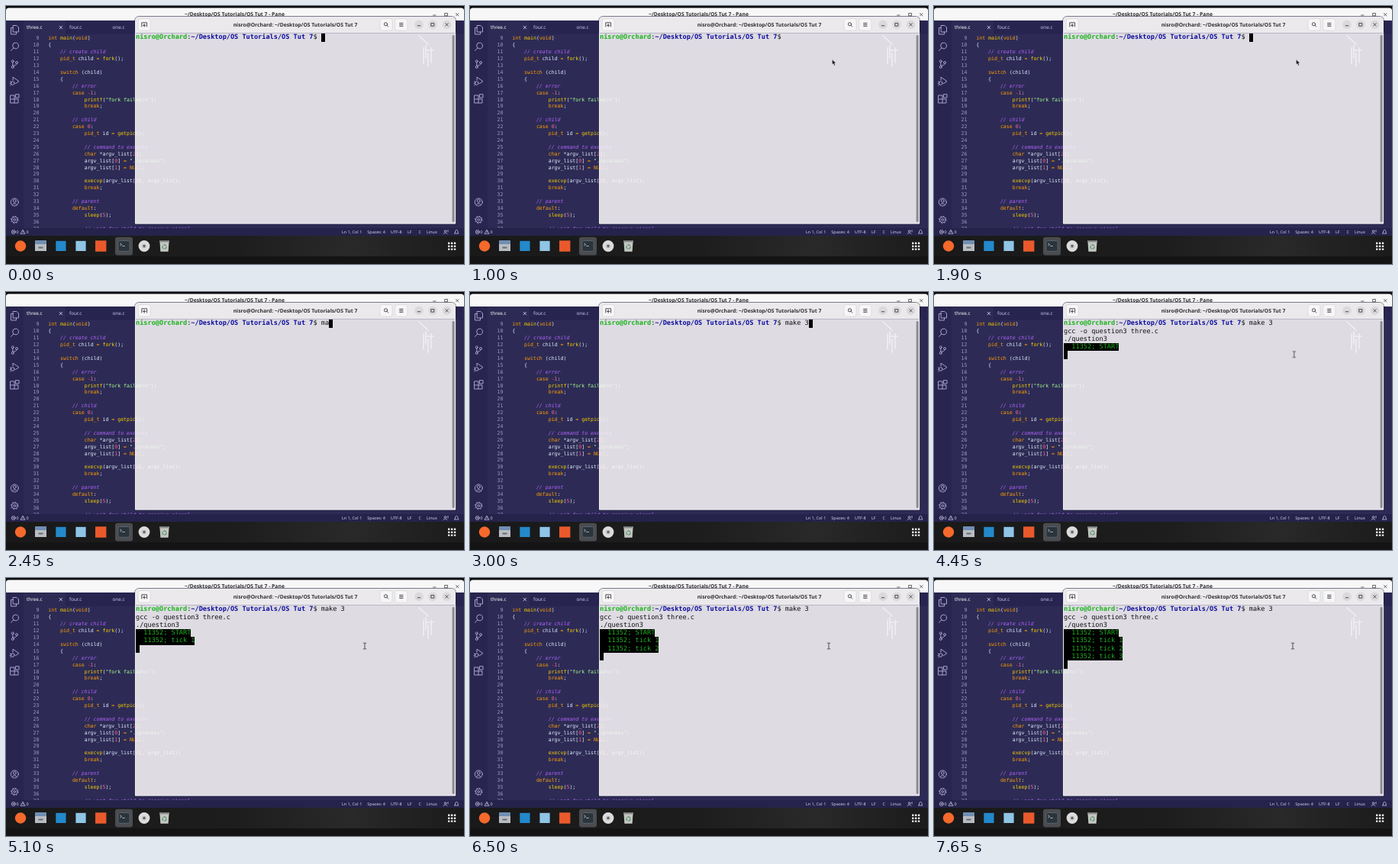
These frames come from a looping animation (600x338 px, 8 s). An HTML page:

```html
<!DOCTYPE html>
<html lang="en">
<head>
<meta charset="utf-8">
<title>Terminal session</title>
<style>
  html, body { margin: 0; width: 100%; height: 100%; overflow: hidden; background: #161616; }
  #stage { position: absolute; left: 0; top: 0; width: 600px; height: 338px; overflow: hidden; }
  #stage, #stage text { text-rendering: geometricPrecision; white-space: pre; }
  svg { position: absolute; left: 0; top: 0; display: block; }
  .ui { font-family: "Noto Sans", "Open Sans", sans-serif; font-size: 6.3px; fill: #c9c5e6; }
  .title { font-size: 6.78px; font-weight: 700; fill: #2e2d30; text-anchor: middle; }
  .status { font-size: 5.45px; fill: #d5d2ec; }
  .listing { font-family: "DejaVu Sans Mono", monospace; font-size: 6.57px; fill: #e1efff; }
  .num { fill: #9d97c8; text-anchor: end; }
  .line { fill: none; stroke-linecap: round; stroke-linejoin: round; }

  #term {
    --ch: 5.171px; --row: 10.28px;
    position: absolute; left: 170px; top: 36.4px; color: #111;
    font: 8.59px/10.28px "DejaVu Sans Mono", monospace;
    white-space: normal;
  }
  #term div.row { display: flex; height: var(--row); white-space: pre; }
  #term b { color: #18b418; }
  #term b.path { color: #0c0c9c; }
  #term .log { background: #000; color: #1fae1f; }
  .block { display: block; width: var(--ch); height: var(--row); background: #000; }
  .typed { overflow: hidden; animation: type 8s step-end infinite; }
  .prompt-block { animation: blink 8s step-end infinite; }
  .run { animation: run 8s step-end infinite; }
  .out { overflow: hidden; animation: print 8s step-end infinite; }
  .arrow { animation: arrow 8s step-end infinite; }
  .beam { animation: beam 8s step-end infinite, drift 8s linear infinite; }

  @keyframes blink {
    0%, 15.5%, 29.3% { opacity: 1; }
    6.2%, 24.9%, 46.7%, 100% { opacity: 0; }
  }
  @keyframes type {
    0% { width: 0; }
    29.3% { width: calc(var(--ch) * 1); }
    30.5% { width: calc(var(--ch) * 2); }
    31.2% { width: calc(var(--ch) * 3); }
    32.4% { width: calc(var(--ch) * 4); }
    34.3% { width: calc(var(--ch) * 5); }
    37.4%, 100% { width: calc(var(--ch) * 6); }
  }
  @keyframes run { 0% { opacity: 0; } 46.7%, 100% { opacity: 1; } }
  @keyframes print {
    0% { height: calc(var(--row) * 3); }
    62.4% { height: calc(var(--row) * 4); }
    78% { height: calc(var(--row) * 5); }
    93.6%, 100% { height: calc(var(--row) * 6); }
  }
  @keyframes arrow { 0%, 29.3%, 100% { opacity: 0; } 6.8% { opacity: 1; } }
  @keyframes beam { 0% { opacity: 0; } 50.5%, 100% { opacity: 1; } }
  @keyframes drift {
    0%, 50.5% { transform: translate(474px, 72px); animation-timing-function: ease-in-out; }
    60%, 100% { transform: translate(470px, 89px); }
  }
</style>
</head>
<body>
<div id="stage">
<svg width="600" height="338" viewBox="0 0 600 338">
  <defs>
    <linearGradient id="desk">
      <stop offset="0" stop-color="#191919"/>
      <stop offset=".5" stop-color="#1d1d1d"/>
      <stop offset=".75" stop-color="#292929"/>
      <stop offset="1" stop-color="#1b1b1b"/>
    </linearGradient>
    <clipPath id="editor"><path d="M23 37H600V291H23Z"/></clipPath>
  </defs>

  <!-- editor window -->
  <rect width="600" height="3" fill="#0b0b0d"/>
  <path d="M0 19V6Q0 2.5 4 2.5H596Q600 2.5 600 6V19Z" fill="#f8f7f8"/>
  <text class="ui title" x="299.5" y="13.4">~/Desktop/OS Tutorials/OS Tut 7 - Pane</text>
  <path class="line" d="M559.5 12H563M575 9.5H578.5V12.8H575ZM589.5 9.5L593 13M593 9.5L589.5 13" stroke="#444" stroke-width=".8"/>
  <rect y="19" width="600" height="282" fill="#2d2b55"/>
  <rect x="78" y="19" width="522" height="18" fill="#272550"/>
  <rect y="19" width="23" height="272" fill="#28264f"/>
  <g class="ui">
    <text x="27" y="30.4" fill="#fff">three.c</text>
    <text x="83" y="30.4">four.c</text>
    <text x="139.5" y="30.4">one.c</text>
  </g>
  <path class="line" d="M70 26.3L73.6 29.9M73.6 26.3L70 29.9" stroke="#e6e4f4" stroke-width=".8"/>

  <g class="line" stroke="#a5a1cf" stroke-width="1">
    <path d="M9.5 25.5H14L16.5 28V34H9.5ZM9.5 28.5H6.5V37H13.5V34"/>
    <path d="M9.6 55.2L6.5 58.5"/><circle cx="12.6" cy="52" r="3.9"/>
    <circle cx="8.8" cy="72.4" r="1.5"/><circle cx="8.8" cy="80" r="1.5"/><circle cx="14" cy="74.2" r="1.5"/>
    <path d="M8.8 74V78.4M14 75.8Q14 78 9 78.2"/>
    <path d="M9 97V93.2L17 98.6L12.5 101.6"/><circle cx="8.8" cy="101" r="2.3"/><path d="M5.5 98.8L7 100M5.2 101.3H6.4M5.6 104L7 102.8"/>
    <path d="M6 117H11V127H6ZM6 122H16V127H11M12.8 115.7H17V120H12.8Z"/>
    <circle cx="11.3" cy="257" r="5"/><circle cx="11.3" cy="255.5" r="1.9"/><path d="M8 260.7Q11.3 256.6 14.6 260.7"/>
    <circle cx="11.3" cy="280" r="3.8"/><circle cx="11.3" cy="280" r="1.4"/>
    <circle cx="11.3" cy="280" r="4.8" stroke-dasharray="1.5 2.27" stroke-linecap="butt"/>
  </g>

  <g id="listing" class="listing" clip-path="url(#editor)"></g>
  <path class="line" d="M541 39L553 50M547 55V75M550 52V68M553 62V79M557 55V74M550 58H560" stroke="#fff" stroke-width="1.6" opacity=".65"/>

  <!-- status bar -->
  <rect y="291" width="600" height="10" fill="#25234b"/>
  <g class="line" stroke="#d5d2ec" stroke-width=".7">
    <circle cx="9.8" cy="296" r="2.5"/><path d="M8.8 295L10.8 297M10.8 295L8.8 297"/>
    <path d="M22.2 293.4L25 298.3H19.4ZM22.2 295.2V296.6"/>
    <circle cx="575.5" cy="295" r="1.3"/><path d="M573 298.5Q575.5 295.4 578 298.5M579 293.5V296"/>
    <path d="M587.5 298H593L592 296.7V295Q590.2 291.5 588.5 295V296.7Z"/>
  </g>
  <g class="ui status">
    <text x="13.4" y="298">0</text><text x="26.6" y="298">0</text>
    <text x="440" y="298">Ln 1, Col 1</text><text x="473.3" y="298">Spaces: 4</text>
    <text x="504" y="298">UTF-8</text><text x="526" y="298">LF</text>
    <text x="540.5" y="298">C</text><text x="551" y="298">Linux</text>
  </g>

  <!-- dock -->
  <rect y="301" width="600" height="37" fill="url(#desk)"/>
  <rect y="328" width="600" height="10" fill="#141414"/>
  <circle cx="19" cy="314.5" r="7.2" fill="#f5692c"/>
  <path d="M38 308.5Q38 307.3 39.2 307.3H51.8Q53 307.3 53 308.5V321H38Z" fill="#b9bcc2"/>
  <path d="M38 307.3H53V312H38Z" fill="#6f8fb4"/>
  <path d="M42.5 315.5H48.5V317.5H42.5Z" fill="#666a72"/>
  <rect x="65.3" y="307.8" width="13.2" height="13.2" fill="#2489ca"/>
  <rect x="91.4" y="307.8" width="13.2" height="13.2" fill="#8fc5e6"/>
  <rect x="117" y="307.3" width="14.4" height="14.4" fill="#e9592b"/>
  <rect x="143" y="302.8" width="23" height="23.6" rx="3" fill="#4a4c50"/>
  <rect x="147" y="307.5" width="15" height="13.8" rx="1.5" fill="#2b343b" stroke="#66717a" stroke-width=".7"/>
  <path class="line" d="M149.7 311L151.5 312.4L149.7 313.8M152.7 314.4H155.3" stroke="#d5dadd" stroke-width=".8"/>
  <circle cx="181" cy="314.5" r="7.4" fill="#dcdcdc"/><circle cx="181" cy="314.5" r="2.7" fill="#b2b2b2"/><circle cx="181" cy="314.5" r="1.2" fill="#444"/>
  <path d="M201.5 309H213.5L212.6 321.8H202.4Z" fill="#c4c6c4"/><path d="M201 307.2H214V309.4H201Z" fill="#8b8e8b"/>
  <circle class="line" cx="207.5" cy="315.5" r="2.6" stroke="#5a9363" stroke-width="1.2" stroke-dasharray="3.6 1.84"/>
  <g id="grid" fill="#f2f2f2"></g>

  <!-- terminal window -->
  <path d="M168.5 285.8V20Q168.5 13.5 175 13.5H583Q589.5 13.5 589.5 20V285.8Z" fill="none" stroke="#16152e" stroke-opacity=".55"/>
  <path d="M169 35.5V20Q169 14 175 14H583Q589 14 589 20V35.5Z" fill="#ebe9ec"/>
  <rect x="169" y="35.5" width="420" height="249.8" fill="#fcf9fb" fill-opacity=".86"/>
  <path d="M169.4 35V285H588.7V35" fill="none" stroke="#f5f4f6" stroke-width=".8"/>
  <rect x="584.6" y="38" width="3" height="245" rx="1.5" fill="#8d8c8f"/>
  <g fill="#f7f6f7" stroke="#d3d0d4" stroke-width=".6">
    <rect x="173.2" y="16.6" width="16" height="15.6" rx="3"/>
    <rect x="490" y="16.6" width="16" height="15.6" rx="3"/>
    <rect x="509.8" y="16.6" width="16" height="15.6" rx="3"/>
  </g>
  <g fill="#dcd9dd"><circle cx="541" cy="24.4" r="5.8"/><circle cx="559" cy="24.4" r="5.8"/><circle cx="577.5" cy="24.4" r="5.8"/></g>
  <g class="line" stroke="#39383b" stroke-width=".9">
    <path d="M177.8 27V21.8H184.6V27M181.2 23.6V27.2M179.4 25.4H183"/>
    <circle cx="497.5" cy="23.8" r="2.1"/><path d="M499.1 25.4L500.8 27.1"/>
    <path d="M515.6 22.4H520M515.6 24.4H520M515.6 26.4H520"/>
    <path d="M539.2 25.8H542.8M557.2 22.6H560.8V26.2H557.2ZM575.8 22.7L579.2 26.1M579.2 22.7L575.8 26.1"/>
  </g>
  <text class="ui title" x="379" y="26.8">nisro@Orchard: ~/Desktop/OS Tutorials/OS Tut 7</text>
</svg>

<div id="term">
  <div class="row"><b>nisro@Orchard</b><span>:</span><b class="path">~/Desktop/OS Tutorials/OS Tut 7</b><span>$ </span><span class="typed">make 3</span><i class="block prompt-block"></i></div>
  <div class="run">
    <div class="out">
      <div class="row">gcc -o question3 three.c</div>
      <div class="row">./question3</div>
      <div class="row"><span class="log">  11352; START</span></div>
      <div class="row"><span class="log">  11352; tick 1</span></div>
      <div class="row"><span class="log">  11352; tick 2</span></div>
      <div class="row"><span class="log">  11352; tick 3</span></div>
    </div>
    <i class="block"></i>
  </div>
</div>

<svg width="600" height="338" viewBox="0 0 600 338">
  <path class="arrow" d="M474.3 69.8V77L476 75.6L477.2 78.2L478.6 77.5L477.5 75.1H479.6Z" fill="#1b1b1d" stroke="#f4f4f4" stroke-width=".6"/>
  <path class="beam line" d="M-1.7 -4Q0 -4 0 -3Q0 -4 1.7 -4M0 -3V3M-1.7 4Q0 4 0 3Q0 4 1.7 4" stroke="#5d5c60" stroke-width="1.1"/>
</svg>
</div>

<script>
const SVG = "http://www.w3.org/2000/svg";
const add = (parent, tag, attrs, text = "") => {
  const el = document.createElementNS(SVG, tag);
  for (const key in attrs) el.setAttribute(key, attrs[key]);
  el.textContent = text;
  parent.append(el);
  return el;
};

const program = String.raw`int main(void)
{
    // create child
    pid_t child = fork();

    switch (child)
    {
        // error
        case -1:
            printf("fork failed\n");
            break;

        // child
        case 0:
            pid_t id = getpid();

            // command to execute
            char *argv_list[2];
            argv_list[0] = "./process";
            argv_list[1] = NULL;

            execvp(argv_list[0], argv_list);
            break;

        // parent
        default:
            sleep(5);

            // wait for child to receive signal`;

// Each rule: pattern and colour; the first that matches wins.
const rules = [
  [/^\/\//, "#b362ff"],
  [/^"/, "#a5ff90"],
  [/^(int|void|char|case|break|default|switch|pid_t|NULL|=)$/, "#ff9d00"],
  [/^(main|fork|printf|getpid|execvp|sleep)$/, "#fad000"],
  [/^-?\d/, "#ff628c"],
];
const tokens = /\/\/.*|"[^"]*"|-?\b\d+|\w+|\s+|[^\w\s]/g;

const listing = document.getElementById("listing");
program.split("\n").forEach((line, i) => {
  const y = 44.4 + i * 8.9;
  add(listing, "text", { class: "num", x: 43.5, y }, i + 9);
  const text = add(listing, "text", { x: 55.3, y });
  for (const token of line.match(tokens) || []) {
    const rule = rules.find(([pattern]) => pattern.test(token));
    const span = add(text, "tspan", rule ? { fill: rule[1] } : {}, token);
    if (token.startsWith("//")) span.setAttribute("font-style", "italic");
  }
});

const grid = document.getElementById("grid");
for (let i = 0; i < 9; i++) {
  add(grid, "rect", { x: 579 + (i % 3) * 3.9, y: 309.6 + Math.floor(i / 3) * 3.9, width: 2.4, height: 2.4, rx: 0.5 });
}
</script>
</body>
</html>
```
